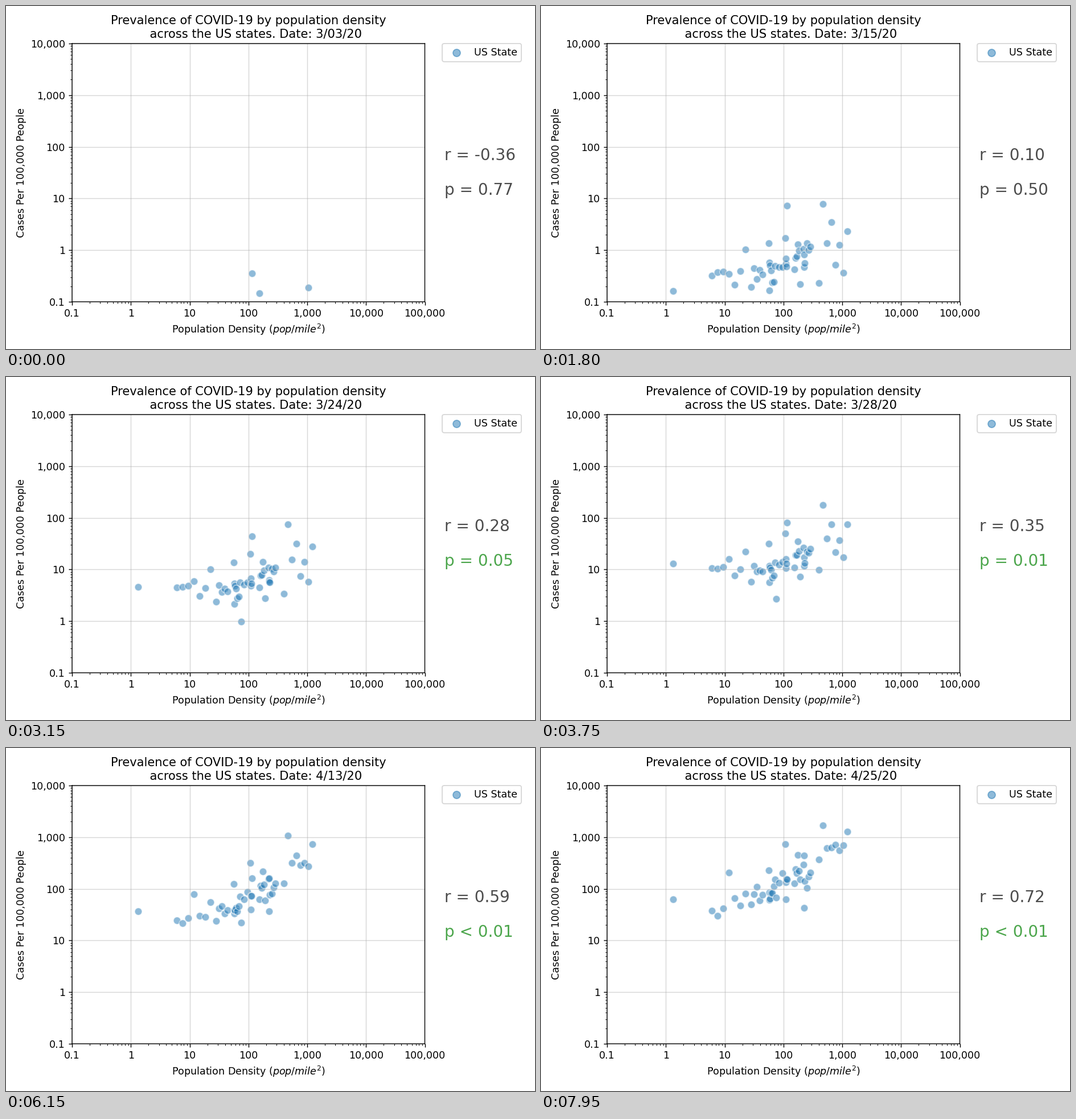
A matplotlib script for the animation above (8000 ms loop, 929 px wide and 603 px high).

```python
import math
import matplotlib.pyplot as plt
import numpy as np
from matplotlib.animation import FuncAnimation

W, H, DPI = 929, 603, 128
K = 0.982                      # point scale of the chart
LEFT, RIGHT, TOP, BOTTOM = 116, 735.5, 66, 520
STATES = 50
BLUE = "#1f77b4"

# Density follows a state's rank through a few key points.
RANKS = [0, 1, 4, 8, 12, 13, 16, 21, 24, 28, 29, 34, 35, 38, 41, 42, 49]
DENSITIES = [1.32, 6, 11.9, 28.2, 44.2, 56, 59, 75, 108, 114, 152, 190,
             218, 231, 288, 404, 1215]
log_density = np.interp(range(STATES), RANKS, np.log10(DENSITIES))
u = log_density - 2

# Log cases: a quadratic in log density whose coefficients drift over time.
DAYS = [0, 8, 16, 25, 33, 41, 53]
BASE = [-2.4, -0.85, 0.25, 1.1, 1.55, 1.8, 2.1]
SLOPE = [0, 0.3, 0.2, 0.27, 0.42, 0.56, 0.59]
BEND = [0, -0.05, 0.08, 0.15, 0.18, 0.21, 0.19]
R_KNOTS = [-0.36, -0.006, 0.2, 0.35, 0.48, 0.59, 0.72]

# Each state's early and late offset from the trend; outliers by rank.
rng = np.random.default_rng(19)
offsets = rng.normal(0, 1, (STATES, 2)) * [0.25, 0.14]
OUTLIERS = {4: (0, 0.6), 13: (0.5, 0.4), 21: (-0.9, -0.2), 24: (0.5, 0.75),
            28: (1.25, 0.05), 32: (0.35, 0.4), 37: (0.2, -0.7),
            39: (0.4, -0.35), 43: (1.05, 0.65), 49: (0.4, 0.15)}
for rank, pair in OUTLIERS.items():
    offsets[rank] = pair
first_level = np.full(STATES, -2.0)
first_level[[28, 29, 48]] = np.log10([0.355, 0.147, 0.19])


def cases(day):
    base, slope, bend = (np.interp(day, DAYS, c) for c in (BASE, SLOPE, BEND))
    late = np.interp(day, [8, 53], [0, 1])
    offset = offsets @ [1 - late, late]
    return np.maximum(base + slope * u + bend * u ** 2 + offset, first_level)


def correlation(day):
    r = float(np.interp(day, DAYS, R_KNOTS))
    if day < 8:
        return r, 0.77 + 0.2 * day / 8
    z = math.atanh(r) * math.sqrt(STATES - 3)
    return r, math.erfc(abs(z) / math.sqrt(2))


def date(day):
    return f"3/{day + 3:02d}/20" if day < 29 else f"4/{day - 28:02d}/20"


plt.rcParams.update({
    "font.family": "DejaVu Sans", "font.size": 10 * K,
    "axes.linewidth": 0.8 * K, "axes.labelpad": 4 * K, "axes.titlepad": 6 * K,
    "xtick.major.size": 3.5 * K, "ytick.major.size": 3.5 * K,
    "xtick.major.width": 0.8 * K, "ytick.major.width": 0.8 * K,
    "xtick.major.pad": 3.5 * K, "ytick.major.pad": 3.5 * K,
})
fig = plt.figure(figsize=(W / DPI, H / DPI), dpi=DPI, facecolor="white")
ax = fig.add_axes([LEFT / W, 1 - BOTTOM / H, (RIGHT - LEFT) / W, (BOTTOM - TOP) / H])

# Axes are in powers of ten.
ax.set(xlim=(-1, 5), ylim=(-1, 4))
ax.set_xticks(range(-1, 6), [f"{10.0 ** k:,g}" for k in range(-1, 6)])
ax.set_yticks(range(-1, 5), [f"{10.0 ** k:,g}" for k in range(-1, 5)])
ax.grid(color="#b0b0b0", alpha=0.5, linewidth=0.8 * K)
ax.set_xlabel("Population Density ($pop/mile^2$)")
ax.set_ylabel("Cases Per 100,000 People")
for spine in ax.spines.values():
    spine.set_snap(False)

minor = np.add.outer(np.arange(-1, 5), np.log10(np.arange(2, 10))).ravel()
minor_y = minor[minor < 4]
tick_style = dict(linestyle="none", color="black", markersize=2 * K,
                  markeredgewidth=0.6 * K, clip_on=False)
ax.plot(minor, np.full(minor.size, -1), marker=3, **tick_style)
ax.plot(np.full(minor_y.size, -1), minor_y, marker=0, **tick_style)

dot_style = dict(s=55 * K * K, color=BLUE, alpha=0.5, linewidths=K)
ax.scatter([], [], label="US State", **dot_style)
dots = ax.scatter(log_density, cases(0), **dot_style)
dots.set_edgecolor("white")
ax.legend(loc="upper left", bbox_to_anchor=(1.05, 1), borderaxespad=0)

title = ax.set_title("", fontsize=12 * K)


def stat(baseline):
    return fig.text(770.2 / W, 1 - baseline / H, "", fontsize=16 * K,
                    color="black", alpha=0.7, va="baseline")


r_text, p_text = stat(271), stat(332.5)


def update(frame):
    day = frame // 3
    r, p = correlation(day)
    title.set_text("Prevalence of COVID-19 by population density\n"
                   f"    across the US states. Date: {date(day)}")
    dots.set_offsets(np.column_stack([log_density, cases(day)]))
    r_text.set_text(f"r = {r:.2f}")
    p_text.set_text("p < 0.01" if p < 0.01 else f"p = {p:.2f}")
    p_text.set_color("green" if p < 0.05 else "black")
    return title, dots, r_text, p_text


anim = FuncAnimation(fig, update, frames=160, interval=50, repeat=True,
                     repeat_delay=0, blit=False)
plt.show()
```
